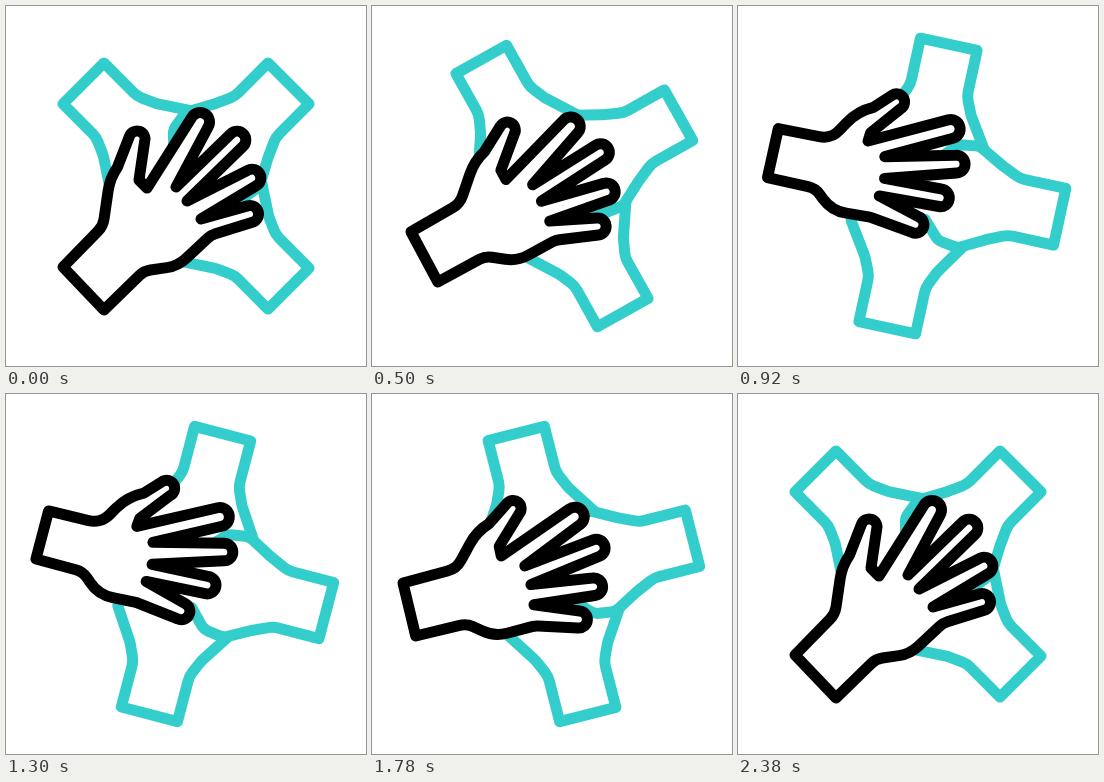
Animation of 360x360 px, one loop 2.4 s. Source, as an HTML page with a canvas:

```html
<!DOCTYPE html>
<html lang="en">
<head>
<meta charset="utf-8">
<title>Hands together</title>
<style>
  html, body { margin: 0; width: 100%; height: 100%; overflow: hidden; background: #fff; }
  canvas { display: block; width: 100vmin; height: 100vmin; }
</style>
</head>
<body>
<canvas id="stage" width="360" height="360"></canvas>
<script>
const ctx = document.getElementById('stage').getContext('2d');
const LOOP = 2400, HALF = 1190, CENTER = 180;
const TURN = Math.PI / 3;
const TEAL = '#33cdcc', BLACK = '#000';

// Hand outline: resting x, y; x, y at the far end of the turn; radius; fingertip flag.
const HAND = [
  [98, 304, 30, 164, 0],
  [57, 261, 43, 116, 0],
  [97, 220, 95, 129, 22],
  [104, 172, 122, 102, 55],
  [131, 133, 161, 94, 8, 1],
  [133, 174, 134, 124, 0],
  [141, 182, 131, 132, 0],
  [194, 116, 214, 123, 9.5, 1],
  [170, 181, 147, 148, 0],
  [231, 134, 218, 158, 8.8, 1],
  [181, 195, 146, 170, 0],
  [246, 172, 201, 191, 8.8, 1],
  [195, 213, 140, 187, 0],
  [244, 208, 175, 217, 8.5, 1],
  [205, 229, 130, 208, 20],
  [172, 260, 92, 200, 36],
  [138, 265, 77, 177, 20]
];

// Half of an arm pointing up: distance from the axis, distance from the centre, radius.
const SLEEVE = [[29, 145, 0], [29, 98, 24], [37, 80, 30], [58, 48, 0]];
const PALM = [[29, 145, 0], [29, 98, 24], [38, 78, 30], [52, 52, 14], [49, 31, 14], [31, 14, 0]];

const SPARKS = [
  [186, 81, 161, 57],
  [195, 80, 194, 38],
  [206, 80, 228, 47]
];

const clamp = v => Math.min(1, Math.max(0, v));
const mix = (a, b, p) => a + (b - a) * p;
const smooth = v => { v = clamp(v); return v * v * (3 - 2 * v); };

// Symmetric cubic-bezier(.72, 0, .28, 1).
function ease(x) {
  let lo = 0, hi = 1;
  for (let i = 0; i < 24; i++) {
    const s = (lo + hi) / 2, r = 1 - s;
    if (3 * r * r * s * 0.72 + 3 * r * s * s * 0.28 + s * s * s < x) lo = s;
    else hi = s;
  }
  return smooth(lo);
}

function rotate(x, y, angle) {
  const c = Math.cos(angle), s = Math.sin(angle);
  return [x * c - y * s, x * s + y * c];
}

function paint(color) {
  ctx.fillStyle = '#fff';
  ctx.strokeStyle = color;
  ctx.fill();
  ctx.stroke();
}

function drawArm(half, angle) {
  const left = half.map(([x, y, r]) => [-x, -y, r]).reverse();
  const points = left.concat(half.map(([x, y, r]) => [x, -y, r]));
  ctx.save();
  ctx.rotate(angle);
  ctx.beginPath();
  points.forEach(([x, y, r], i) => {
    const next = points[i + 1];
    if (!i) ctx.moveTo(x, y);
    else if (r && next) ctx.arcTo(x, y, next[0], next[1], r);
    else ctx.lineTo(x, y);
  });
  paint(TEAL);
  ctx.restore();
}

function drawHand(p) {
  const nodes = HAND.map(([ax, ay, bx, by, r, tip]) => {
    const [x, y] = rotate(bx - CENTER, by - CENTER, -TURN);
    return { x: mix(ax - CENTER, x, p), y: mix(ay - CENTER, y, p), r, tip };
  });
  ctx.beginPath();
  nodes.forEach((n, i) => {
    const prev = nodes[i - 1], next = nodes[(i + 1) % nodes.length];
    if (n.tip) {
      const axis = Math.atan2(n.y - (prev.y + next.y) / 2, n.x - (prev.x + next.x) / 2);
      ctx.arc(n.x, n.y, n.r, axis - Math.PI / 2, axis + Math.PI / 2);
    } else if (n.r) {
      ctx.arcTo(n.x, n.y, next.x, next.y, n.r);
    } else {
      ctx.lineTo(n.x, n.y);
    }
  });
  ctx.closePath();
  paint(BLACK);
}

function drawSparks(t) {
  const head = smooth((t - 1920) / 240), tail = smooth((t - 2040) / 280);
  if (head - tail < 0.01) return;
  ctx.strokeStyle = TEAL;
  for (const [x1, y1, x2, y2] of SPARKS) {
    ctx.beginPath();
    ctx.moveTo(mix(x1, x2, tail), mix(y1, y2, tail));
    ctx.lineTo(mix(x1, x2, head), mix(y1, y2, head));
    ctx.stroke();
  }
}

function draw(t) {
  const p = ease(clamp(1 - Math.abs(t - HALF) / HALF));
  ctx.fillStyle = '#fff';
  ctx.fillRect(0, 0, 360, 360);
  ctx.lineWidth = 11;
  ctx.lineCap = ctx.lineJoin = 'round';
  drawSparks(t);
  ctx.save();
  ctx.translate(CENTER, CENTER);
  ctx.rotate(TURN * p);
  drawArm(SLEEVE, -Math.PI / 4);
  drawArm(SLEEVE, Math.PI * 3 / 4);
  drawArm(PALM, Math.PI / 4);
  drawHand(p);
  ctx.restore();
}

const start = performance.now();
function tick() {
  draw((performance.now() - start) % LOOP);
  requestAnimationFrame(tick);
}
tick();
</script>
</body>
</html>
```
